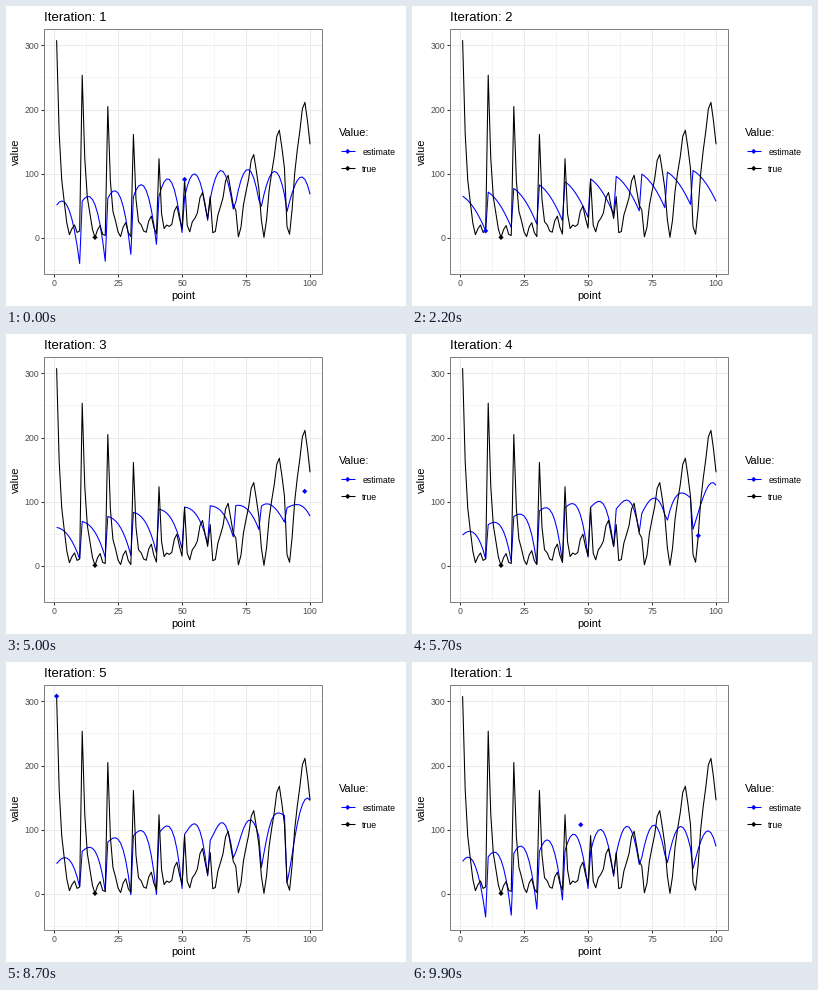
Write a matplotlib script that moves like this. It is 400x300 px and loops after 10 s.

```python
import numpy as np
import matplotlib.pyplot as plt
from matplotlib.animation import FuncAnimation
from matplotlib.patches import Rectangle, RegularPolygon

W, H, DPI = 400, 300, 100
FRAMES, STATES = 100, 5
PX = 72 / DPI
LINE = 1.07 * PX
LEFT, TOP, RIGHT, BOTTOM = 38, 23, 316, 268
DARK, GRID, BORDER, TICK_TEXT = "#333333", "#ebebeb", "#7f7f7f", "#4d4d4d"

plt.rcParams["font.family"] = "Liberation Sans"


def px(v):
    return 48.05 + 2.56 * np.asarray(v)


def py(v):
    return 231.9 - 0.6417 * np.asarray(v)


# The black curve: a test function on a 10 x 10 grid, read row by row.
def branin(x, y):
    bend = y - 5.1 / (4 * np.pi**2) * x**2 + 5 / np.pi * x - 6
    return bend**2 + 10 * (1 - 1 / (8 * np.pi)) * np.cos(x) + 10


u, v = np.meshgrid(np.linspace(0, 1, 10), np.linspace(0, 1, 10))
true = branin(15 * u - 5, 15 * v).ravel()
points = np.arange(1, 101)


def across(*keys):
    """Polynomial over the rows through evenly spaced key values."""
    n = len(keys)
    return np.polyval(np.polyfit(np.linspace(0, 1, n), keys, n - 1), v)


def domes(start, peak, end, centre):
    """Each row is a skewed arch from start over its peak to end."""
    left = (peak - start) / centre**2
    right = (peak - end) / (1 - centre)**2
    return peak - (u - centre)**2 * (left + (right - left) * u)


first = domes(across(51, 64.5, 41), across(57.5, 83, 105, 95),
              across(-40, -10, 45, 68), across(0.23, 0.4, 0.63))
falling = domes(across(65, 89.7, 105), across(69, 94, 108.6),
                across(11, 34.5, 57), across(-0.36))
fourth = domes(across(43, 92, 42.5), across(54, 88, 106, 113, 149),
               across(11, -2, 17, 81, 146), across(0.38, 0.39, 0.89))
dip = np.exp(-((1 - v) / 0.28)**2 - (u / 0.35)**2)
fifth = fourth + 4 * (1 - u) - 29 * dip
estimates = [s.ravel() for s in (first, falling, falling, fourth, fifth)]

picks = np.array([51, 10, 100, 91, 1])
candidates = np.column_stack([picks, true[picks - 1]])

fig = plt.figure(figsize=(W / DPI, H / DPI), dpi=DPI, facecolor="white")
ax = fig.add_axes([0, 0, 1, 1])
ax.set_xlim(0, W)
ax.set_ylim(H, 0)
ax.axis("off")


def line(xs, ys, color, width=LINE, z=3):
    return ax.plot(xs, ys, color=color, lw=width, zorder=z,
                   solid_joinstyle="round", solid_capstyle="butt")[0]


def diamond(x, y, color):
    return ax.add_patch(RegularPolygon((x, y), 4, radius=2.6, color=color,
                                       lw=0, zorder=5))


def label(x, y, text, size, color="black", **kw):
    return ax.text(x, y, text, fontsize=size * PX, color=color,
                   va="baseline", **kw)


def grid_x(value, width):
    line([px(value)] * 2, [TOP, BOTTOM], GRID, width, 1)


def grid_y(value, width):
    line([LEFT, RIGHT], [py(value)] * 2, GRID, width, 1)


for tick in np.arange(12.5, 100, 25):
    grid_x(tick, LINE / 2)
for tick in range(-50, 300, 100):
    grid_y(tick, LINE / 2)
for tick in range(0, 101, 25):
    grid_x(tick, LINE)
    line([px(tick)] * 2, [BOTTOM, BOTTOM + 3], DARK, LINE, 2)
    label(px(tick), 279.7, str(tick), 8.8, TICK_TEXT, ha="center")
for tick in range(0, 301, 100):
    grid_y(tick, LINE)
    line([LEFT - 3, LEFT], [py(tick)] * 2, DARK, LINE, 2)
    label(33.4, py(tick) + 3.2, str(tick), 8.8, TICK_TEXT, ha="right")
ax.add_patch(Rectangle((LEFT, TOP), RIGHT - LEFT, BOTTOM - TOP, fill=False,
                       ec=BORDER, lw=PX, zorder=6))

label(177.4, 292.6, "point", 11, ha="center")
label(13.2, 146, "value", 11, ha="center", rotation=90, rotation_mode="anchor")
title = label(38, 15, "", 13.2)

label(333.2, 130, "Value:", 11)
for y, name, color in [(145.4, "estimate", "blue"), (162.4, "true", "black")]:
    line([334.8, 348.6], [y, y], color)
    diamond(341.7, y, color)
    label(356.2, y + 3.4, name, 8.8)

curve = line(px(points), py(first.ravel()), "blue", z=3)
line(px(points), py(true), "black", z=4)
best = true.argmin()
diamond(px(best + 1), py(true[best]), "black")
marker = diamond(0, 0, "blue")


def update(i):
    step = FRAMES // STATES
    k, r = divmod(i, step)
    hold = 7 if k else 6
    t = max(0, (r - hold) / (step - hold))
    nxt = (k + 1) % STATES
    curve.set_ydata(py((1 - t) * estimates[k] + t * estimates[nxt]))
    x, y = (1 - t) * candidates[k] + t * candidates[nxt]
    marker.xy = (px(x), py(y))
    title.set_text(f"Iteration: {(nxt if t > 0.5 else k) + 1}")
    return curve, marker, title


anim = FuncAnimation(fig, update, frames=FRAMES, interval=100, repeat=True)
plt.show()
```
